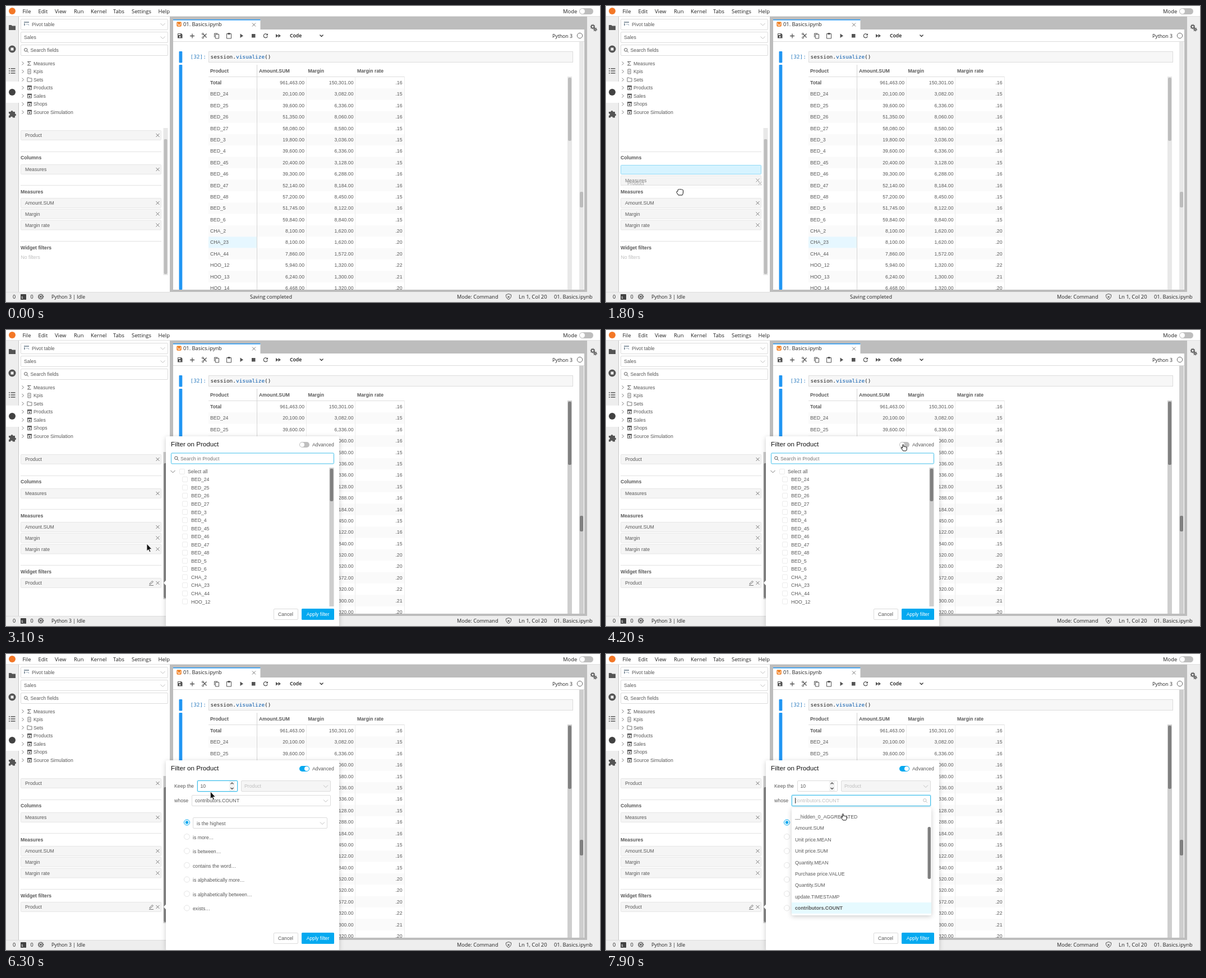
Write an HTML page that moves like this. It is 1059 px wide and 529 px high and loops after 8 s.

```html
<!DOCTYPE html>
<html lang="en">
<head>
<meta charset="utf-8">
<title>Pivot table filter</title>
<style>
html, body { margin: 0; width: 100%; height: 100%; overflow: hidden; background: #fff; }
svg { display: block; width: 1059px; height: 529px; }
text { font: 8.73px "Liberation Sans", Arial, sans-serif; fill: #595959; white-space: pre; }
.ui { font: 9.45px "Open Sans", "Noto Sans", sans-serif; fill: #212121; }
.status { font-size: 9.1px; }
.file { font-size: 9.3px; }
.small { font-size: 8.73px; }
.strong { font-weight: 600; fill: #111; }
.code { font: 9.45px "DejaVu Sans Mono", monospace; fill: #212121; }
.title { font-size: 11.64px; fill: #111; }
.bold { font-weight: bold; }
.end { text-anchor: end; }
.mid { text-anchor: middle; }
.pale { fill: #bfbfbf; }
.track { fill: #e8e8e8; }
.thumb { fill: #bdbdbd; }
.focused .track, .solid .track { fill: #cecece; }
.focused .thumb, .solid .thumb { fill: #808080; }
#popup { transform-origin: 333px 351px; }
.shadow { filter: drop-shadow(0 2px 4px rgba(0, 0, 0, .2)); }
</style>
</head>
<body>
<svg id="stage" viewBox="0 0 1059 529"></svg>
<script>
const BLUE = '#2196f3', ACCENT = '#03a9f0', FOCUS = '#40bfea', GREY = '#bdbdbd', LINE = '#dcdcdc', DARK = '#545454';

const text = (x, y, s, cls = '', o = '') => `<text x="${x}" y="${y + 3.1}" class="${cls}" ${o}>${s}</text>`;
const rect = (x, y, w, h, fill, stroke, rx = 0, o = '') => stroke
  ? `<rect x="${x + .5}" y="${y + .5}" width="${w - 1}" height="${h - 1}" fill="${fill}" stroke="${stroke}" rx="${rx}" ${o}/>`
  : `<rect x="${x}" y="${y}" width="${w}" height="${h}" fill="${fill}" rx="${rx}" ${o}/>`;
const fill = (d, color) => `<path d="${d}" fill="${color}"/>`;
const line = (d, color = DARK, w = 1) => `<path d="${d}" fill="none" stroke="${color}" stroke-width="${w}"/>`;
const circle = (x, y, r, color, stroke = 'none', w = 1) => `<circle cx="${x}" cy="${y}" r="${r}" fill="${color}" stroke="${stroke}" stroke-width="${w}"/>`;
const group = (id, body, o = '') => `<g id="${id}" ${o}>${body}</g>`;

const chevron = (x, y, color = '#bfbfbf') => line(`M${x - 4} ${y - 2}l4 4 4-4`, color);
const expander = y => line(`M28.5 ${y - 3}l3 3-3 3`, '#777');
const cross = (x, y, r = 3) => line(`M${x - r} ${y - r}l${2 * r} ${2 * r}m0 ${-2 * r}l${-2 * r} ${2 * r}`, '#777');
const lens = (x, y, color = DARK) => circle(x - .7, y - .7, 2.7, 'none', color) + line(`M${x + 1.2} ${y + 1.2}l2.6 2.6`, color);
const scrollbar = (x, y, h, ty, th) =>
  `<rect class="track" x="${x}" y="${y}" width="8" height="${h}"/>` +
  `<rect class="thumb" x="${x + 1}" y="${ty}" width="6" height="${th}" rx="2"/>`;
const chip = (y, name, o = '') => rect(26, y - 9, 251, 18, '#f5f5f5', '#e6e6e6', 1, o) + text(34, y, name) + cross(270.5, y);
const slot = y => rect(26, y - 8, 251, 17, '#d6f3ff', '#91d9f5', 1);
const box = (x, y, w, h, stroke = LINE, back = '#fff', o = '') => rect(x, y, w, h, back, stroke, 1.5, o);
const pill = (x, y, w, h, color, on) =>
  rect(x, y, w, h, color, '', h / 2) + circle(on ? x + w - h / 2 : x + h / 2, y + h / 2, h / 2 - 1, '#fff');

const rows = [['Total', 961463, 150301], ['BED_24', 20100, 3082], ['BED_25', 39600, 6336], ['BED_26', 51350, 8060],
  ['BED_27', 58080, 8580], ['BED_3', 19800, 3036], ['BED_4', 39600, 6336], ['BED_45', 20400, 3128],
  ['BED_46', 39300, 6288], ['BED_47', 52140, 8184], ['BED_48', 57200, 8450], ['BED_5', 51745, 8122],
  ['BED_6', 59840, 8840], ['CHA_2', 8100, 1620], ['CHA_23', 8100, 1620], ['CHA_44', 7860, 1572],
  ['HOO_12', 5940, 1320], ['HOO_13', 6240, 1300], ['HOO_14', 6468, 1320]];
const money = n => n.toLocaleString('en-US', { minimumFractionDigits: 2 });

function frame() {
  const menu = [['File', 29.5], ['Edit', 57.5], ['View', 87], ['Run', 121], ['Kernel', 151], ['Tabs', 191], ['Settings', 224], ['Help', 271.5]];
  return rect(0, 0, 1059, 529, '#fff') + rect(0, 18, 1059, 1, '#e0e0e0') +
    circle(11, 9, 6, '#f37726') + menu.map(([s, x]) => text(x, 9.5, s, 'ui')).join('') +
    text(993, 9.5, 'Mode', 'ui') + pill(1022, 4, 25, 11, GREY) +
    rect(0, 19, 23, 493, '#eee') + rect(22, 19, 1, 493, '#c8c8c8') + rect(0, 135, 23, 38, '#fff') +
    rect(292, 19, 744, 493, GREY) + rect(1036, 19, 23, 493, '#eee') + rect(0, 511, 1059, 18, '#eee') +
    rect(0, 511, 292, 1, '#ddd');
}

function sideIcons() {
  const puzzle = 'M5 189h3.5a2 2 0 1 1 4 0h3.5v3.5a2 2 0 1 1 0 4v3h-4a2 2 0 0 0-4 0h-3v-3.5a2 2 0 0 0 0-4z';
  const gear = (x, y, r) => circle(x, y, r, 'none', DARK, 1.5) +
    `<circle cx="${x}" cy="${y}" r="${r + 1.3}" fill="none" stroke="${DARK}" stroke-width="1.2" stroke-dasharray="1.4 1.5"/>`;
  return fill('M5 34h4.5l1.5 1.5h6v7.5h-12z', DARK) +
    circle(11, 77, 6.5, DARK) + rect(8.5, 74.5, 5, 5, '#eee') +
    [112, 116, 120].map(y => line(`M5 ${y}h2m1.5 0h8`, DARK, 1.4)).join('') +
    circle(11, 154, 6, '#424242') + fill(puzzle, DARK) + gear(1046, 37, 2.5) + gear(1050.5, 42, 1.6);
}

function statusBar() {
  const y = 519.5;
  const chipIcon = circle(62, y, 3.5, 'none', DARK, 1.2) + rect(60.5, 518, 3, 3, DARK) +
    `<circle cx="62" cy="${y}" r="4.7" fill="none" stroke="${DARK}" stroke-width="1.2" stroke-dasharray="1.2 1.3"/>`;
  return text(12, y, '0', 'ui status') + rect(26, 515, 10, 10, '#424242', '', 1) +
    text(27, y, '$_', 'code', 'style="font-size:6px;fill:#fff"') + text(43.5, y, '0', 'ui status') + chipIcon +
    text(81, y, 'Python 3 | Idle', 'ui small') + text(435, y, 'Saving completed', 'ui status') +
    text(804, y, 'Mode: Command', 'ui status') +
    line('M896 514.5l4.5 1.5v3.5q-1 3.5-4.5 5q-3.5-1.5-4.5-5v-3.5zM894 518l4 4m0-4l-4 4') +
    text(914, y, 'Ln 1, Col 20', 'ui') + text(977, y, '01. Basics.ipynb', 'ui file');
}

function fieldPanel() {
  const tree = ['Measures', 'Kpis', 'Sets', 'Products', 'Sales', 'Shops', 'Source Simulation'];
  const icon = (i, y) => i === 0 ? line(`M44.5 ${y - 3}h-6l3.5 3-3.5 3.5h6`) :
    i === 1 ? line(`M39 ${y - 4}h5v8h-5zM40.5 ${y - 1}h2m-2 2h2`, '#777') :
    i === 2 ? line(`M38 ${y - 3.5}h3l1 1h4v6h-8z`, '#777') :
    line(`M38.5 ${y - 3}h7v6.5h-7z`) + fill(`M38 ${y - 4}h8v2.5h-8zM40.5 ${y}h3v2h-3z`, DARK);
  const items = tree.map((s, i) => {
    const y = 102.5 + i * 14.55;
    return expander(y) + icon(i, y) + text(49, y, s);
  }).join('');
  const heads = [['Columns', 271], ['Measures', 331.5], ['Widget filters', 431.5]];
  return box(26, 23, 263, 20) + fill('M32 28h9v2h-9zM32 31h2v4h-2z', '#8c9aa5') + line('M35.5 32.5h5v2.5', '#a9b8c4') +
    text(46, 32.5, 'Pivot table') + chevron(279.5, 33) +
    box(26, 46, 263, 20) + text(32, 56, 'Sales') + chevron(279.5, 56.5) +
    box(26, 69, 263, 20) + lens(36, 79) + text(43.5, 79, 'Search fields') + items +
    heads.map(([s, y]) => rect(26, Math.floor(y - 11), 251, 1, '#e2e2e2') + text(26, y, s, 'bold')).join('') +
    chip(352, 'Amount.SUM') + chip(371.5, 'Margin') + chip(391.5, 'Margin rate') +
    scrollbar(280.5, 218, 263, 238, 241) +
    group('rowChip', chip(231, 'Product')) + group('columnSlot', slot(292)) + group('columnChip', chip(292, 'Measures')) +
    group('noFilters', text(26.5, 449, 'No filters', 'pale')) + group('filterSlot', slot(452)) +
    group('filterChip', chip(452, 'Product') + line('M256 454.5l.5-2 4.5-4 1.5 1.5-4.5 4zM255 456.5h8', '#777')) +
    group('ghost', chip(231, 'Product', 'opacity=".4"'), 'opacity=".5"');
}

function toolbar() {
  return rect(298, 24, 155.5, 19, '#fff') + rect(298, 24, 155.5, 1.5, BLUE) +
    rect(304.5, 28.5, 8, 8, '#ef6c00', '', 1) + rect(306, 30, 5, 5, '#fff') + fill('M307 30h3v4l-1.5-1-1.5 1z', '#ef6c00') +
    text(316, 32.5, '01. Basics.ipynb', 'ui file') + cross(442, 33.5) +
    rect(298, 42, 733, 465, '#fff') + rect(298, 63, 733, 1, '#dcdcdc') +
    fill('M306 49h6.5l2 2v6.5h-8.5z', DARK) + rect(307, 50, 4, 2, '#fff') + circle(310, 55, 1.3, '#fff') +
    line('M328 53.5h8m-4-4v8', DARK, 1.3) +
    line('M351 49.5l6.5 7m-6.5 0l6.5-7', DARK, 1.2) + circle(351, 50, 1.5, '#fff', DARK) + circle(351, 56.5, 1.5, '#fff', DARK) +
    line('M371.5 56v-7h6M373.5 50.5h6v7.5h-6z') +
    line('M393.5 49.5h8v8.5h-8z') + rect(395.5, 48, 4, 3, DARK) +
    fill('M417.5 49.5l5.5 3.7-5.5 3.7z', DARK) + rect(438, 50, 6.5, 6.5, DARK) +
    line('M465.5 51a3.5 3.5 0 1 0 .7 3', DARK, 1.2) + fill('M467 49v3.5h-3.5z', DARK) +
    fill('M481 50l4.5 3.2-4.5 3.2zM485.5 50l4.5 3.2-4.5 3.2z', DARK) +
    text(506, 53, 'Code', 'ui small strong') + line('M559.5 51.5l3 3 3-3', '#333', 1.3) +
    text(974, 53.5, 'Python 3', 'ui small') + circle(1023, 53, 4.7, '#fff', '#666');
}

function notebook() {
  const cells = rows.map(([name, sum, margin], i) => {
    const y = 137 + i * 20.38, top = y - 10;
    return (i % 2 ? rect(361, top, 349, 20.38, '#fafafa') : '') +
      (name === 'CHA_23' ? rect(361, top, 86, 20.38, '#e6f7ff') : '') +
      text(364, y, name, i ? '' : 'bold') + text(532, y, money(sum), 'end') +
      text(619.5, y, money(margin), 'end') + text(706.5, y, (margin / sum).toFixed(2).slice(1), 'end');
  }).join('');
  const heads = [['Product', 364], ['Amount.SUM', 451], ['Margin', 538.5], ['Margin rate', 626]];
  return rect(308.5, 81, 5.8, 20.5, BLUE, '', 1) + rect(308.5, 105, 5.8, 402, BLUE, '', 1) +
    text(328.5, 91, '[32]:', 'code', 'style="fill:#307fc1"') + rect(361, 81, 650, 20, '#f7f7f7', '#dcdcdc') +
    text(364.5, 91, 'session.<tspan fill="#0055aa">visualize</tspan>()', 'code') +
    '<clipPath id="sheet"><rect x="298" y="64" width="733" height="443"/></clipPath><g clip-path="url(#sheet)">' + cells + '</g>' +
    heads.map(([s, x], i) => text(x, i ? 116 : 115.5, s, 'bold')).join('') + rect(361, 126, 349, 1, '#dedede') +
    rect(447, 105, 1, 402, '#d4d4d4') + [535, 622, 710].map(x => rect(x, 126, 1, 381, '#ececec')).join('') +
    scrollbar(1001, 126, 381, 128, 113) + scrollbar(1022, 64, 443, 332, 28);
}

function popup() {
  const tick = (x, y) => box(x - 5, y - 5, 10, 10, '#ebebeb');
  const list = rows.slice(1, 17).map(([s], i) => {
    const y = 267 + i * 14.55;
    return tick(319, y) + text(330, y + .2, s);
  }).join('');
  const simple = pill(523, 200, 18, 10, '#bfbfbf') + box(294, 219.5, 291, 20, FOCUS, '#fff', 'id="searchBox"') + lens(304, 229.5) +
    text(311, 229.5, 'Search in Product', '', 'style="fill:#757575"') + group('searchCaret', rect(311, 225, 1, 10, '#333')) +
    chevron(297.5, 253, '#777') + tick(314, 253) + text(324, 253, 'Select all') + list +
    `<g class="solid">${scrollbar(576.5, 246, 248, 248, 58)}</g>`;
  const radios = ['', 'is more…', 'is between…', 'contains the word…', 'is alphabetically more…', 'is alphabetically between…', 'exists…'];
  const options = radios.map((s, i) => {
    const y = 301 + i * 25.5;
    return circle(322.5, y, 5, '#fff', i ? '#e4e4e4' : ACCENT) + (i ? text(333, y + 1, s) : circle(322.5, y, 2.7, ACCENT));
  }).join('');
  const advanced = pill(523, 200, 18, 10, ACCENT, true) + text(300, 236, 'Keep the') +
    group('countGlow', rect(340, 225, 74, 22, '#cdeefb', '', 3)) +
    box(341, 226, 72, 20, LINE, '#fff', 'id="countBox"') + group('selection', rect(346, 231, 6, 10, '#1e90d8')) +
    text(346.5, 236, '', '', 'id="count"') +
    rect(398, 227, 10, 18, '#f3f3f3') + line('M400.5 232.5l2.5-2.5 2.5 2.5M400.5 239l2.5 2.5 2.5-2.5', '#444', 1.2) +
    box(419, 226, 160, 20, LINE, '#f5f5f5') + text(425, 236, 'Product', 'pale') + chevron(570, 236.5) +
    text(300, 262, 'whose') + group('fieldGlow', rect(330, 251, 250, 22, '#cdeefb', '', 3)) +
    box(331, 252, 248, 20, LINE, '#fff', 'id="fieldBox"') + text(337, 262, 'contributors.COUNT', '', 'id="field"') +
    group('fieldArrow', chevron(570, 262.5)) + group('fieldSearch', lens(569, 262, '#bfbfbf') + rect(337, 257, 1, 10, '#333')) +
    options + box(333, 292, 240, 20) + text(340, 302.5, 'is the highest') + chevron(564, 302.5);
  return rect(285, 190, 309, 339.5, '#fff', '', 2, 'class="shadow"') + fill('M285.5 447l-4.5 5 4.5 5z', '#fff') +
    text(294, 205.2, 'Filter on Product', 'title') + text(546, 205, 'Advanced') +
    group('simple', simple) + group('advanced', advanced) +
    box(477, 498, 44, 20) + text(498.5, 508, 'Cancel', 'mid') +
    rect(527, 498, 58, 20, ACCENT, '', 1.5) + text(556, 508, 'Apply filter', 'mid', 'style="fill:#fff"');
}

function dropdown() {
  const names = ['__hidden_0_AGGREGATED', 'Amount.SUM', 'Unit price.MEAN', 'Unit price.SUM', 'Quantity.MEAN',
    'Purchase price.VALUE', 'Quantity.SUM', 'update.TIMESTAMP', 'contributors.COUNT'];
  return rect(331, 275, 249, 192, '#fff', '', 2, 'class="shadow"') + rect(331, 444, 249, 20, '#e6faff') +
    names.map((s, i) => text(337, 291 + i * 20.38, s, i === 8 ? 'bold' : '')).join('') +
    rect(573.5, 309, 5.5, 93, '#808080', '', 2.5);
}

const ink = 'stroke="#111" stroke-linejoin="round" stroke-width="1"';
const pointers = {
  arrow: '<path d="M-4-8v13l3-2.5 2 4.5 2-1-2-4.3h4z" fill="#111" stroke="#fff" stroke-width=".8"/>',
  open: `<path d="M-3 6l-3.5-5q-.5-1.7 1.5-1l1 1.2v-5.5q1-1.5 2 0v-1.5q1-1.5 2.2 0v.8q1-1.2 2 0v1.5q1.2-1 2 .3v4q0 3-1.7 5.2z" fill="#fff" ${ink}/><path d="M-2 0v-4m2.2 4v-4.5m2 4.5v-3.5" ${ink}/>`,
  closed: `<path d="M-3 6l-3-4.5q-.8-2.5 2-2.5v-2.5q1-1.5 2.5-.5 1.2-1.3 2.5 0 1.5-1 2.5.4 1.5-.7 2 .8v3.8q0 3-1.5 5z" fill="#fff" ${ink}/>`,
  hand: `<path d="M-1.5 6l-3.7-5q-.5-1.8 1.4-1l1.2 1.2v-6q1-1.5 2 0v3.3q1.1-.9 2 .2 1-.7 1.9.4 1.4-.5 1.7.9v3q0 1.8-1.3 3z" fill="#fff" ${ink}/>`,
  beam: '<path d="M-2.5-5.5q2.5 0 2.5 1.5 0-1.5 2.5-1.5M0-4v8M-2.5 5.5q2.5 0 2.5-1.5 0 1.5 2.5 1.5" fill="none" stroke="#222" stroke-width="1.1"/>',
  blocked: '<circle r="4.5" fill="#fff" stroke="#222" stroke-width="2"/><path d="M-3-3l6 6" transform="scale(-1 1)" stroke="#222" stroke-width="2"/>'
};

// time, x, y, pointer shape held until the next point
const route = [
  [500, 95, 54, 'arrow'], [800, 112, 160, 'arrow'], [1000, 126, 234, 'open'], [1100, 128, 246, 'open'],
  [1400, 128, 246, 'open'], [1500, 128, 249, 'closed'], [1600, 129, 264, 'closed'], [1800, 132, 332, 'closed'],
  [2000, 133, 392, 'closed'], [2300, 134, 453, 'closed'], [2800, 134, 453, 'closed'], [2900, 138, 450, 'open'],
  [3100, 255, 390, 'arrow'], [3600, 600, 240, 'arrow'], [3700, 597, 236, 'arrow'], [4100, 532, 210, 'hand'],
  [4500, 529, 210, 'hand'], [4700, 492, 245, 'arrow'], [4800, 450, 262, 'hand'], [4900, 402, 252, 'hand'],
  [5000, 372, 238, 'beam'], [5100, 356, 236, 'beam'], [5200, 330, 226, 'beam'], [5400, 263, 203, 'beam'],
  [5500, 265, 205, 'arrow'], [5800, 282, 221, 'arrow'], [5900, 282, 221, 'arrow'], [6400, 390, 262, 'hand'],
  [6800, 470, 268, 'hand'], [7000, 476, 240, 'blocked'], [7100, 476, 229, 'blocked'], [7300, 535, 250, 'blocked'],
  [7400, 572, 262, 'hand'], [7700, 572, 262, 'beam'], [7900, 424, 291, 'hand'], [8000, 424, 291, 'hand']
];

function pointerAt(t) {
  const i = route.findLastIndex(p => p[0] <= t);
  if (i < 0) return null;
  const [t0, x0, y0, shape] = route[i], [t1, x1, y1] = route[Math.min(i + 1, route.length - 1)];
  const k = t1 > t0 ? (t - t0) / (t1 - t0) : 0;
  return { x: x0 + (x1 - x0) * k, y: y0 + (y1 - y0) * k, shape };
}

const stage = document.getElementById('stage');
stage.innerHTML = frame() + sideIcons() + statusBar() + fieldPanel() + toolbar() + notebook() +
  group('popup', popup()) + group('dropdown', dropdown()) +
  group('pointer', Object.entries(pointers).map(([k, v]) => group(k, v)).join(''));

const el = id => document.getElementById(id);
const show = (id, on) => { el(id).style.display = on ? '' : 'none'; };
const within = (t, a, b) => t >= a && t < b;

function draw(t) {
  const p = pointerAt(t), dragging = within(t, 1600, 2800), dropped = t >= 2800;
  const overColumns = within(t, 1700, 2200), overFilters = within(t, 2200, 2800);
  stage.classList.toggle('focused', within(t, 1500, 1600) || dropped);

  show('rowChip', !dragging);
  show('columnSlot', overColumns);
  el('columnChip').setAttribute('transform', `translate(0 ${overColumns ? 19.5 : 0})`);
  show('filterSlot', overFilters);
  show('noFilters', t < 2200);
  show('filterChip', dropped);
  show('ghost', dragging);
  if (dragging) el('ghost').setAttribute('transform', `translate(${p.x - 128} ${p.y - 246})`);

  const opening = t < 2900, isAdvanced = t >= 4400;
  show('popup', dropped);
  el('popup').style.transform = opening ? 'scale(.951)' : 'none';
  el('popup').style.opacity = opening ? .78 : 1;
  el('searchBox').setAttribute('stroke', opening ? '#b0dcea' : FOCUS);
  show('simple', !isAdvanced);
  show('advanced', isAdvanced);
  show('searchCaret', opening);

  const counting = within(t, 5100, 7400), selecting = within(t, 5200, 5600), open = t >= 7400;
  const hover = within(t, 4800, 5000) || within(t, 6400, 7400);
  show('countGlow', counting);
  el('countBox').setAttribute('stroke', counting ? FOCUS : LINE);
  show('selection', selecting);
  el('count').textContent = t < 5600 ? '5' : t < 5700 ? '1' : '10';
  el('count').style.fill = selecting ? '#fff' : '';

  show('fieldGlow', open);
  el('fieldBox').setAttribute('stroke', open || hover ? FOCUS : LINE);
  el('field').style.fill = open ? '#bfbfbf' : '';
  show('fieldArrow', !open);
  show('fieldSearch', open);
  show('dropdown', open);
  el('dropdown').style.opacity = t < 7500 ? .6 : 1;

  show('pointer', p);
  if (p) {
    el('pointer').setAttribute('transform', `translate(${p.x} ${p.y})`);
    for (const k in pointers) show(k, k === p.shape);
  }
}

const start = performance.now();
function tick() {
  const t = (performance.now() - start) % 8000;
  draw(Math.floor(t / 100) * 100);
  requestAnimationFrame(tick);
}
tick();
</script>
</body>
</html>
```
